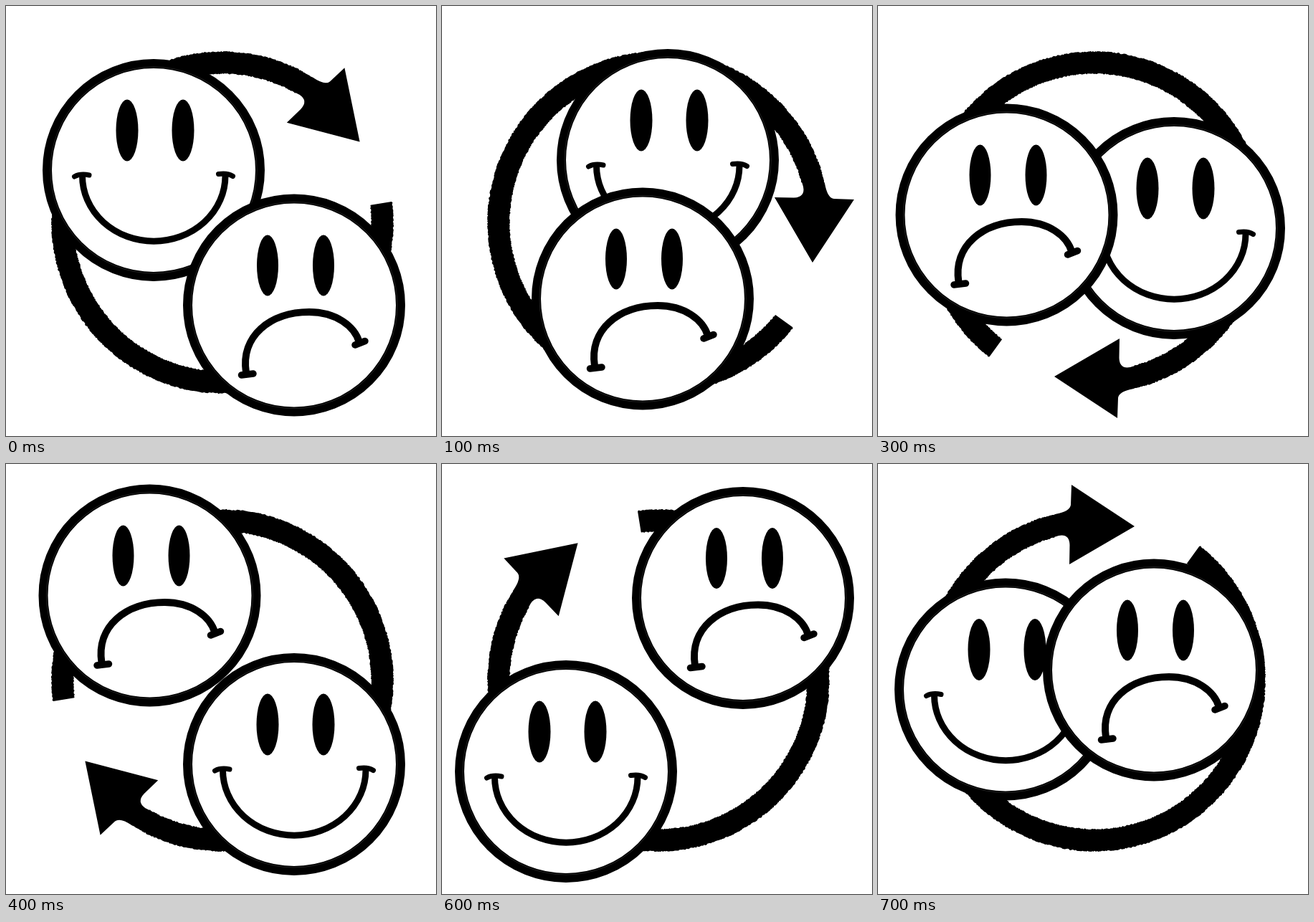
Recreate the animation shown at these times as an HTML page with a canvas. Size 600 by 600 pixels, loop 0.8 s.

```html
<!DOCTYPE html>
<html lang="en">
<head>
<meta charset="utf-8">
<title>Mood swing</title>
<style>
html, body { margin: 0; width: 100%; height: 100%; overflow: hidden; background: #fff; }
canvas { display: block; width: 600px; height: 600px; }
</style>
</head>
<body>
<canvas id="stage" width="600" height="600"></canvas>
<script>
const ctx = document.getElementById('stage').getContext('2d');
const STEP = 100, COUNT = 8, MID = 302, DEG = Math.PI / 180;

// Face centres, one per step.
const happyPath = [[206, 229], [315, 215], [424.5, 201], [413, 310], [402, 419], [288, 424.5], [173, 429], [178, 314.5]];
const sadPath = [[402, 417.5], [280, 408.5], [158.5, 399.5], [179.5, 291.5], [200.5, 183.5], [309.5, 185.5], [420, 187], [385, 287.5]];

// Smile and frown strokes, relative to the face centre: [width, path].
const happyMouth = [
  [9, 'M-99.5 8A99.5 91 0 0 0 100 8'],
  [7, 'M-110.5 9Q-102 4.5 -90 7M90.5 5.5Q103 3.5 110.5 8.5']
];
const sadMouth = [
  [10, 'M-67 94C-75 43 -33 9.5 21 9.5C58 9.5 84.5 29 91 52'],
  [9.5, 'M-73.5 97.5L-57 95.5M85 55.5L99 50']
];

let seed = 7;
const rough = () => {
  seed = seed * 16807 % 2147483647;
  return (seed / 2147483647 - 0.5) * 1.5;
};

// Arrow with its tip at the top right; the band runs clockwise from tail to head.
function buildArrow() {
  const p = new Path2D();
  const edge = (radius, from, to) => {
    const n = Math.round(Math.abs(to - from) / 0.4);
    for (let i = 0; i <= n; i++) {
      const a = (from + (to - from) * i / n) * DEG, r = radius + rough();
      p.lineTo(MID + r * Math.cos(a), MID + r * Math.sin(a));
    }
  };
  edge(238.5, -52, 257);
  p.quadraticCurveTo(268, 66, 269, 57);
  p.lineTo(270, 29);
  p.lineTo(358, 87);
  p.lineTo(267, 140);
  p.lineTo(267.5, 113);
  p.quadraticCurveTo(267, 97, 252, 100);
  edge(207.5, 255, -51.7);
  p.closePath();
  return p;
}
const arrow = buildArrow();

function drawArrow(k) {
  ctx.save();
  ctx.translate(MID, MID);
  ctx.rotate((k + 1) * 45 * DEG);
  ctx.translate(-MID, -MID);
  ctx.fill(arrow);
  ctx.restore();
}

function circle(r, width, color) {
  ctx.beginPath();
  ctx.arc(0, 0, r, 0, 2 * Math.PI);
  ctx.lineWidth = width;
  ctx.strokeStyle = color;
  ctx.stroke();
}

function drawFace([x, y], mouth, eyeW, eyeH) {
  ctx.save();
  ctx.translate(x, y);
  ctx.fillStyle = '#fff';
  ctx.beginPath();
  ctx.arc(0, 0, 148, 0, 2 * Math.PI);
  ctx.fill();
  circle(148.5, 13, '#000');
  circle(144, 0.5, '#444');
  ctx.fillStyle = ctx.strokeStyle = '#000';
  for (const ex of [-37, 41]) {
    ctx.beginPath();
    ctx.ellipse(ex, -55.5, eyeW, eyeH, 0, 0, 2 * Math.PI);
    ctx.fill();
  }
  ctx.lineCap = 'round';
  for (const [width, path] of mouth) {
    ctx.lineWidth = width;
    ctx.stroke(new Path2D(path));
  }
  ctx.restore();
}

function draw() {
  const k = Math.floor(performance.now() / STEP) % COUNT;
  ctx.fillStyle = '#fff';
  ctx.fillRect(0, 0, 600, 600);
  ctx.fillStyle = '#000';
  drawArrow(k);
  drawFace(happyPath[k], happyMouth, 15.5, 43);
  drawFace(sadPath[k], sadMouth, 15, 42.5);
  requestAnimationFrame(draw);
}
draw();
</script>
</body>
</html>
```
